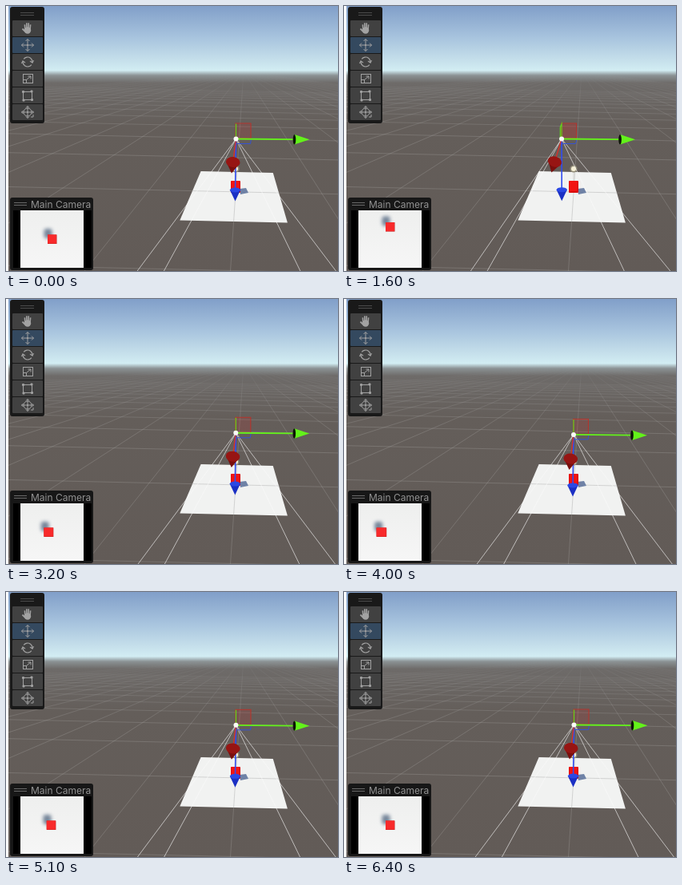
An HTML page with a canvas for the animation above (6500 ms loop, 415x332 px).

```html
<!DOCTYPE html>
<html lang="en">
<head>
<meta charset="utf-8">
<title>Camera gizmo</title>
<style>
html, body { margin: 0; width: 100%; height: 100%; overflow: hidden; background: #fff; }
canvas { display: block; width: 415px; height: 332px; }
</style>
</head>
<body>
<canvas id="stage" width="415" height="332"></canvas>
<script>
const W = 415, H = 332, LOOP = 6500, STEP = 100, HORIZON = 82;
const stage = document.getElementById('stage');
const g = stage.getContext('2d');

const ease = p => p <= 0 ? 0 : p >= 1 ? 1 : p * p * (3 - 2 * p);

// Eases out to a size at the peak time and back again.
const swing = (t, from, peak, to, size) =>
  size * (t < peak ? ease((t - from) / (peak - from)) : ease((to - t) / (to - peak)));

const sideways = t => swing(t, 500, 1050, 1900, 54) + swing(t, 5400, 5900, 6300, 28);
const forward = t => swing(t, 1900, 2400, 3320, 99) + swing(t, 3700, 4400, 5200, 29);

// Screen place of a ground point; the white plane spans -1..1 both ways.
function ground(side, depth) {
  const drop = 1 / (.00663 - .00131 * depth);
  const lean = .358 * side - .066;
  return [297 + drop * lean, HORIZON + drop * (1 + .008 * side)];
}

function path(c, pts) {
  c.beginPath();
  pts.forEach(p => c.lineTo(...p));
}

function poly(c, color, pts) {
  c.fillStyle = color;
  path(c, pts);
  c.fill();
}

function line(c, color, pts, width = 1) {
  c.strokeStyle = color;
  c.lineWidth = width;
  path(c, pts);
  c.stroke();
}

function rect(c, color, x, y, w, h, r = 0) {
  c.fillStyle = color;
  c.beginPath();
  c.roundRect(x, y, w, h, r);
  c.fill();
}

function oval(c, color, x, y, rx, ry = rx) {
  c.fillStyle = color;
  c.beginPath();
  c.ellipse(x, y, rx, ry, 0, 0, 7);
  c.fill();
}

function arc(c, color, x, y, r, from, to, width = 1) {
  c.strokeStyle = color;
  c.lineWidth = width;
  c.beginPath();
  c.arc(x, y, r, from, to);
  c.stroke();
}

function fade(c, y0, y1, stops) {
  const f = c.createLinearGradient(0, y0, 0, y1);
  stops.forEach(([p, color]) => f.addColorStop(p, color));
  return f;
}

// Draws the same part n times around a point.
function around(c, x, y, n, part) {
  for (let i = 0; i < n; i++) {
    c.save();
    c.translate(x, y);
    c.rotate(i * 2 * Math.PI / n);
    part();
    c.restore();
  }
}

function grid(c) {
  c.save();
  c.beginPath();
  c.rect(3, HORIZON + 5, W, H);
  c.clip();
  const ink = fade(c, HORIZON, 170, [[0, 'rgba(165,165,165,0)'], [.4, 'rgba(165,165,165,.2)'], [1, 'rgba(165,163,160,.36)']]);
  for (let k = -24; k <= 24; k += 2) line(c, ink, [[297, HORIZON], ground(k, 2.2)], .9);
  for (let k = -26; k <= 2; k += 2) line(c, ink, [ground(-30, k), ground(30, k)], .9);
  c.restore();
}

function icons(c) {
  const ink = '#a2a2a2', x = 27;
  const arrows = (y, r, h) => around(c, x, y, 4, () => {
    line(c, ink, [[0, 1], [0, -r]]);
    line(c, ink, [[-h, h - r], [0, -r], [h, h - r]]);
  });
  // hand
  oval(c, ink, x, 30.5, 4.2);
  for (let i = -1.5; i < 2; i++) line(c, ink, [[x + i * 2, 30], [x + i * 2.4, 21 + i * i]], 1.6);
  line(c, ink, [[x - 2, 33], [x - 6.5, 28.5]], 1.8);
  // move
  arrows(49, 7.5, 2.5);
  // rotate
  around(c, x, 70, 2, () => {
    arc(c, ink, 0, 0, 6, -2.5, 0, 1.2);
    line(c, ink, [[3, -1], [6, 1], [7.5, -2]], 1.2);
  });
  // scale
  c.lineWidth = 1;
  c.strokeRect(21.5, 85.5, 12, 11);
  c.strokeRect(21.5, 92.5, 4, 4);
  line(c, ink, [[26, 92], [31, 88]]);
  line(c, ink, [[27.5, 88], [31, 88], [31, 91.5]]);
  // rect
  c.strokeRect(21.5, 107.5, 11, 10);
  around(c, x, 112.5, 4, () => rect(c, ink, 4, 3.5, 3, 3, 1));
  // transform
  arrows(133, 7.5, 2);
  arc(c, ink, x, 133, 5, 0, 7);
  line(c, ink, [[31, 139], [34, 139], [34, 136]]);
}

function toolbar(c) {
  rect(c, '#191919', 5, 1, 43, 146, 3);
  for (const y of [8, 11]) rect(c, '#4c4c4c', 18, y, 17, 1);
  for (let i = 0; i < 6; i++) rect(c, i === 1 ? '#34495f' : '#414141', 8, 18 + 21 * i, 38, 20, 1);
  icons(c);
}

function makeBackdrop() {
  const layer = document.createElement('canvas');
  layer.width = W;
  layer.height = H;
  const c = layer.getContext('2d');
  rect(c, '#fff', 0, 0, W, H);
  rect(c, fade(c, 0, H, [[0, '#819fc9'], [.12, '#a8c4de'], [.2, '#c4deea'], [.243, '#d2edf3'],
    [.262, '#8b9294'], [.29, '#6e6b69'], [.45, '#645e5a'], [1, '#625b57']]), 3, 0, W, H);
  grid(c);

  poly(c, '#f1f2f1', [ground(-1, -1), ground(1, -1), ground(1, 1), ground(-1, 1)]);
  line(c, 'rgba(150,150,150,.35)', [ground(-1, 0), ground(1, 0)]);
  line(c, 'rgba(150,150,150,.35)', [ground(0, -1), ground(0, 1)]);

  // cube, its shadow and the light above
  poly(c, '#6f82a6', [[292, 229], [300, 228], [303, 234], [293, 236]]);
  rect(c, '#d80d0c', 281, 219, 12, 15, 1);
  rect(c, '#f21412', 281.5, 219, 10, 13, 1);
  line(c, 'rgba(190,190,185,.6)', [[287, 207], [287, 219]]);
  oval(c, '#8f8a76', 287, 204, 4.6);
  oval(c, '#f6f0d6', 287, 204, 3);
  toolbar(c);
  return layer;
}

// A cone whose base centre is (x, y), pointing along (dx, dy).
function cone(x, y, dx, dy, radius, length, side, base, flat) {
  g.save();
  g.translate(x, y);
  g.rotate(Math.atan2(dy, dx));
  poly(g, side, [[0, -radius], [length, 0], [0, radius]]);
  oval(g, base, 0, 0, flat, radius);
  g.restore();
}

// Rays from the camera through the corners of the ground it sees.
function frustum(x, y, u, s) {
  for (const a of [-.75, .75]) {
    for (const d of [-.74, .74]) {
      const [gx, gy] = ground(a - u / 58, d + s / 53.5);
      line(g, 'rgba(250,250,250,.68)', [[x, y], [x + (gx - x) * (H - y) / (gy - y), H]], .9);
    }
  }
}

function handles(x, y, u, q, mode) {
  const k = u / 53;
  const rx = x - 4 - 18 * k, ry = y + 31 - 2 * k + q * .33;
  const bx = x - 1 + 4 * k, by = y + 68 - k - q * .15;

  if (mode === 'front') {
    line(g, '#55504c', [[353, y - 6], [353, y + 6], [368, y], [353, y - 6]], .9);
    line(g, '#f3e98c', [[x, y], [rx + 1, ry - 6]], 3);
    cone(rx, ry - 5, -.05, 1, 8.5, 19, '#d9cd1c', '#ece12a', 4);
    rect(g, '#fbf8dc', x - 4, y - 3, 8, 6, 2);
    return;
  }

  // plane handles
  rect(g, `rgba(205,40,35,${.17 + .4 * k})`, x - 1, y - 19, 20, 19);
  g.strokeStyle = '#b8332c';
  g.lineWidth = 1;
  g.strokeRect(x - .5, y - 19.5, 19, 19);
  line(g, '#5dd71d', [[x, y], [x - 6 * k, y + 3 * k], [x - 6 * k, y - 15 + k], [x, y - 19], [x, y]], 1.2);
  line(g, '#3552d2', [[x, y], [x - 2 * k, y + 6], [x + 18 - 2 * k, y + 6], [x + 19, y]]);

  // down axis
  line(g, '#304cf0', [[x, y], [bx, by]], 1.6);
  cone(bx, by - 4, 0, 1, 6.6, 14, '#1b30c4', '#2b48e4', 3);

  // front axis
  const far = Math.hypot(rx - x, ry - y), dx = (rx - x) / far, dy = (ry - y) / far;
  line(g, '#d7322a', [[x, y], [rx, ry]], 1.4);
  cone(rx - dx * 2, ry - dy * 2, dx, dy, 8.8, 14, '#7a0f0d', '#971513', 6.5);

  // side axis
  const lit = mode === 'side', color = lit ? '#f1e42a' : '#63f21a', base = x + 73;
  line(g, color, [[x, y], [base, y + .7]], 1.8);
  cone(base, y + .8, 1, 0, 6.2, 19, color, lit ? '#c4b91a' : u < 25 ? '#0b1405' : '#4cc512', 1.8);

  oval(g, '#fafaf7', x, y, 3);
}

function preview(u, s) {
  rect(g, '#171717', 5, 240, 104, 91, 3);
  for (const y of [246, 249]) rect(g, '#6a6a6a', 10, y, 16, 1);
  g.fillStyle = '#929292';
  g.font = '12px Inter, sans-serif';
  g.fillText('Main Camera', 31, 253);
  rect(g, '#000', 9, 256, 98, 72);

  g.save();
  g.beginPath();
  g.rect(18, 256, 79, 72);
  g.clip();
  rect(g, '#6a625d', 18, 256, 79, 72);
  const x = 57.5 - s, y = 292 - u, lean = Math.min(s / 10, 4);
  rect(g, fade(g, 256, 328, [[0, '#eeefee'], [1, '#f6f6f6']]), x - 53.5, y - 58, 107, 116);
  g.filter = 'blur(2px)';
  rect(g, '#76869a', x - 10 + lean * 1.8, y - 13, 10, 12, 3);
  g.filter = 'none';
  rect(g, '#c01d1d', x - 5.5, y - 5.5, 11.5 + lean, 11.5);
  rect(g, '#f82a2b', x - 5.5, y - 5.5, 11 + lean, 11);
  g.restore();
}

const backdrop = makeBackdrop();

function draw(now) {
  const t = Math.floor(now % LOOP / STEP) * STEP;
  const u = sideways(t), s = forward(t);
  const q = .258 * s + .00354 * s * s;
  const x = 287.5 - u - q * .15, y = 166.5 + q;
  const mode = t >= 400 && t < 1000 ? 'side' : t >= 2000 && t < 2900 ? 'front' : '';
  g.drawImage(backdrop, 0, 0);
  frustum(x, y, u, s);
  handles(x, y, u, q, mode);
  preview(u, s);
}

const start = performance.now();
function tick() {
  draw(performance.now() - start);
  requestAnimationFrame(tick);
}
tick();
</script>
</body>
</html>
```
